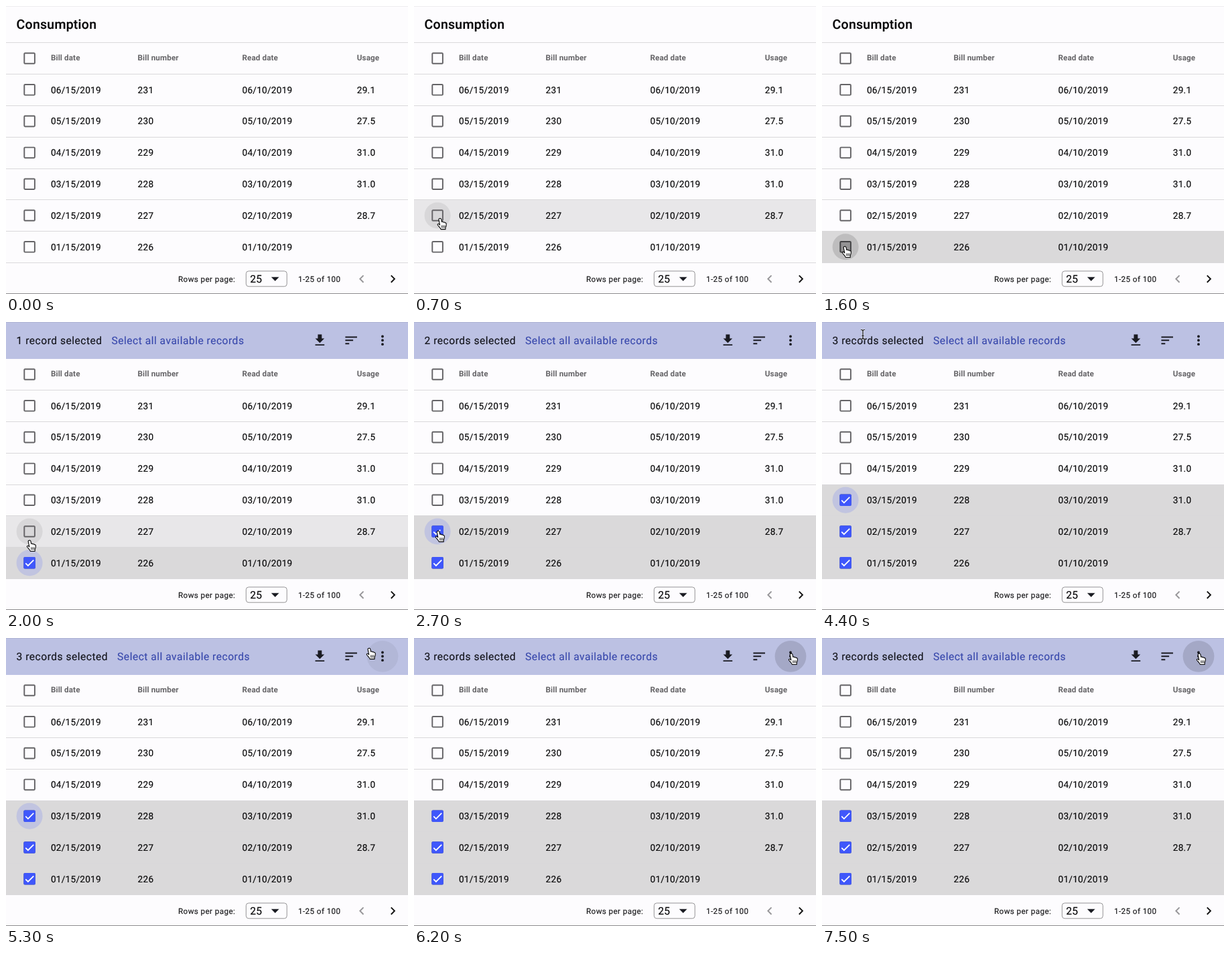
An HTML page for the animation above (7600 ms loop, 600 px wide and 429 px high).

```html
<!DOCTYPE html>
<html lang="en">
<head>
<meta charset="utf-8">
<title>Consumption table</title>
<style>
  html, body { margin: 0; height: 100%; overflow: hidden; background: #fdfcfe; }
  svg { display: block; width: 600px; height: 429px; }
  text {
    font: 400 14px Roboto, sans-serif; letter-spacing: .0178571em; white-space: pre;
    text-rendering: geometricPrecision; fill: #060607; stroke: #060607; stroke-width: .15;
  }
  .title { font-size: 20px; font-weight: 500; letter-spacing: .0125em; }
  .head { font-size: 12px; font-weight: 700; letter-spacing: .008em; fill: #666568; stroke: none; }
  .note { font-size: 12px; letter-spacing: .0333em; fill: #1c1c1e; }
  .body { font-size: 16px; letter-spacing: .03125em; fill: #15161e; }
  .value { font-size: 16px; letter-spacing: .009375em; }
  .link { fill: #3848ac; stroke: #3848ac; }
  .line { stroke: #dad9db; shape-rendering: crispEdges; }
  .row { shape-rendering: crispEdges; }
  .box { fill: none; stroke: #656467; stroke-width: 2; }
  .box.pressed { fill: rgba(0, 0, 0, .22); stroke: #434345; }
  .tick { fill: none; stroke: #fff; stroke-width: 3.12; stroke-dasharray: 30; }
</style>
</head>
<body>
<svg>
  <g id="ui" transform="scale(.975)"></g>
  <path d="M0 .5H600" stroke="#000" stroke-opacity=".06"/>
  <path d="M0 428.5H600" stroke="#8c8c8e"/>
  <g id="cursor">
    <g id="hand" transform="translate(-.4 0) scale(1.08)" stroke="#000" stroke-linejoin="round" stroke-linecap="round">
      <path fill="#fff" d="M0 .2C1.1-.1 2 .5 2.2 1.6L2.9 5C3.8 4.4 4.8 4.7 5.2 5.5C6.1 5 7 5.4 7.3 6.2C8.3 5.9 9.1 6.5 9.1 7.7C9.2 10 8.8 11.5 8 12.8L7.9 15.2H1.6C1.2 13.4-1.2 11.4-2.7 9.5C-3.6 8.2-2.2 7.2-1.1 8L.2 9.1L-1.3 2C-1.5 1.1-.9 .4 0 .2Z"/>
      <path fill="none" stroke-width=".8" d="M3 10v3M4.9 10v3M6.8 10v3"/>
    </g>
    <g id="beam" fill="none">
      <path id="stem" d="M-3-7Q0-7 0-5Q0-7 3-7M0-5V5M-3 7Q0 7 0 5Q0 7 3 7M-1.5 2h3" stroke="#fff" stroke-opacity=".7" stroke-width="2.6"/>
      <path d="M-3-7Q0-7 0-5Q0-7 3-7M0-5V5M-3 7Q0 7 0 5Q0 7 3 7M-1.5 2h3" stroke="#111" stroke-width="1.2"/>
    </g>
    <path id="arrow" d="M0 0V14L3.2 11L5.3 16L7.6 15L5.5 10.2H10Z" stroke="#fff"/>
  </g>
</svg>
<script>
const LOOP = 7600, SCALE = .975;
const $ = id => document.getElementById(id);
const clamp = v => Math.max(0, Math.min(1, v));
const show = (el, on) => el.style.display = on ? '' : 'none';

const COLS = [68.6, 201.6, 361.5, 537.2];
const USAGE = ['29.1', '27.5', '31.0', '31.0', '28.7', ''];
const ICONS = [
  [480.4, 'M19 9h-4V3H9v6H5l7 7 7-7zM5 18v2h14v-2H5z'],
  [528.4, 'M3 18h6v-2H3v2zM3 6v2h18V6H3zm0 7h12v-2H3v2z'],
  [576.4, 'M12 8a2 2 0 1 0 0-4 2 2 0 0 0 0 4zm0 2a2 2 0 1 0 0 4 2 2 0 0 0 0-4zm0 6a2 2 0 1 0 0 4 2 2 0 0 0 0-4z']
];
// When each picked row darkens, gets its tick and loses focus
const PICKS = {
  5: { dark: 1550, check: 1650, blur: 2550 },
  4: { dark: 2450, check: 2550, blur: 3400 },
  3: { dark: 3050, check: 3400, blur: 5850 }
};
const MENU_PRESS = 5750;
// Pointer path: time, x, y
const PATH = [
  [90, 62, 422], [200, 50, 350], [300, 42, 280], [450, 42, 280], [800, 38, 325],
  [1200, 34, 358], [1800, 34, 358], [2000, 35, 325], [2300, 36, 311], [2700, 36, 311],
  [3000, 38, 274], [4250, 38, 274], [4350, 60, 26], [4400, 61, 18.5], [4600, 90, 11],
  [4800, 190, 11], [5150, 470, 13], [5400, 580, 16], [5600, 572, 24], [5900, 563, 23]
];

const text = (x, y, s, cls = '') => `<text x="${x}" y="${y}" class="${cls}">${s}</text>`;
const icon = (x, y, d, fill = '#1a1b22') =>
  `<path transform="translate(${x - 12} ${y - 12})" d="${d}" fill="${fill}"/>`;
const box = (y, id) => `<rect id="${id}" class="box" x="28" y="${y - 8}" width="16" height="16" rx="1.2"/>`;

function row(i) {
  const y = 128 + 48 * i, month = `0${6 - i}`;
  const cells = [`${month}/15/2019`, 231 - i, `${month}/10/2019`, USAGE[i]];
  return `<rect id="bg${i}" class="row" y="${y - 24}" width="616" height="48"/>
    <circle id="ripple${i}" cx="36" cy="${y}" r="20"/>${box(y, 'box' + i)}
    <g id="mark${i}"><rect x="27" y="${y - 9}" width="18" height="18" rx="2" fill="#3f57fb"/>
    <path id="tick${i}" class="tick" transform="translate(29 ${y - 7}) scale(.5833)" d="M1.73 12.91L8.1 19.28L22.79 4.59"/></g>
    ${cells.map((c, k) => text(COLS[k], y + 5, c)).join('')}`;
}

$('ui').innerHTML =
  text(16, 35.3, 'Consumption', 'title') + box(80, 'boxAll') +
  ['Bill date', 'Bill number', 'Read date', 'Usage'].map((s, k) => text(COLS[k], 83.3, s, 'head')).join('') +
  USAGE.map((_, i) => row(i)).join('') +
  [...Array(8).keys()].map(k => `<path class="line" d="M0 ${56.3 + 48 * k}H616"/>`).join('') +
  text(263.6, 421.2, 'Rows per page:', 'note') +
  '<rect x="367.5" y="405" width="62.5" height="23.5" rx="4" fill="none" stroke="#929194"/>' +
  text(373.6, 423, '25', 'value') +
  '<path d="M406 414.2h12l-6 6z" fill="#1a1b22"/>' +
  text(447.2, 421.2, '1-25 of 100', 'note') +
  icon(544.5, 417, 'M15.41 7.41L14 6l-6 6 6 6 1.41-1.41L10.83 12z', '#98979a') +
  icon(592.2, 417, 'M10 6L8.59 7.41 13.17 12l-4.58 4.59L10 18l6-6z', '#111') +
  `<g id="bar"><rect class="row" width="616" height="56" fill="#bcc1e3"/>
   <text y="33.5" class="body"><tspan id="count" x="16"></tspan><tspan dx="14.4" class="link">Select all available records</tspan></text>
   ${ICONS.map(([x, d], k) => `<circle id="halo${k}" cx="${x}" cy="28" r="24"/>` + icon(x, 28, d)).join('')}</g>`;

function pointer(t) {
  const n = PATH.findIndex(p => p[0] > t);
  if (n < 0) return PATH[PATH.length - 1].slice(1);
  if (n === 0) return null;
  const a = PATH[n - 1], b = PATH[n];
  const u = (t - a[0]) / (b[0] - a[0]), e = u * u * (3 - 2 * u);
  return [a[1] + (b[1] - a[1]) * e, a[2] + (b[2] - a[2]) * e];
}

function pointerKind(x, y) {
  if (y > 54.6) return x < 56 && y < 382 ? 'hand' : 'arrow';
  if (x < 153) return 'beam';
  const onIcon = ICONS.some(([cx]) => Math.abs(x - cx * SCALE) < 23.4);
  return onIcon || (x > 166 && x < 365) ? 'hand' : 'arrow';
}

function draw(t) {
  const pos = pointer(t), [x, y] = pos || [-99, -99];
  const hovered = t < 4250 ? Math.floor((y / SCALE - 104) / 48) : -1;
  let count = 0;

  for (let i = 0; i < 6; i++) {
    const p = PICKS[i], ripple = $('ripple' + i);
    const checked = p && t >= p.check, over = hovered === i;
    const focused = checked && t < p.blur;
    const pressed = p && !checked && t >= p.check - 90;
    if (checked) {
      count++;
      $('mark' + i).style.opacity = clamp((t - p.check) / 90);
      $('tick' + i).style.strokeDashoffset = 30 * (1 - clamp((t - p.check) / 180));
    }
    show($('mark' + i), checked);
    $('bg' + i).setAttribute('fill', p && t >= p.dark ? '#dad9da' : over ? '#e8e7e9' : 'none');
    $('box' + i).classList.toggle('pressed', !!pressed);
    ripple.setAttribute('fill', focused ? '#3f57fb' : '#000');
    ripple.setAttribute('fill-opacity', focused ? .16 : pressed ? .13 : over && !checked && x < 56 ? .07 : 0);
  }

  show($('bar'), count);
  $('count').textContent = `${count} record${count > 1 ? 's' : ''} selected`;
  ICONS.forEach(([cx], k) => {
    const over = y < 54 && Math.abs(x - cx * SCALE) < 23.4;
    $('halo' + k).setAttribute('fill-opacity', k === 2 && t >= MENU_PRESS ? .13 : over ? .05 : 0);
  });

  show($('cursor'), pos);
  $('cursor').setAttribute('transform', `translate(${x} ${y})`);
  const kind = pointerKind(x, y);
  for (const k of ['hand', 'beam', 'arrow']) show($(k), k === kind);
}

const start = performance.now();
function frame() {
  draw((performance.now() - start) % LOOP);
  requestAnimationFrame(frame);
}
frame();
</script>
</body>
</html>
```
